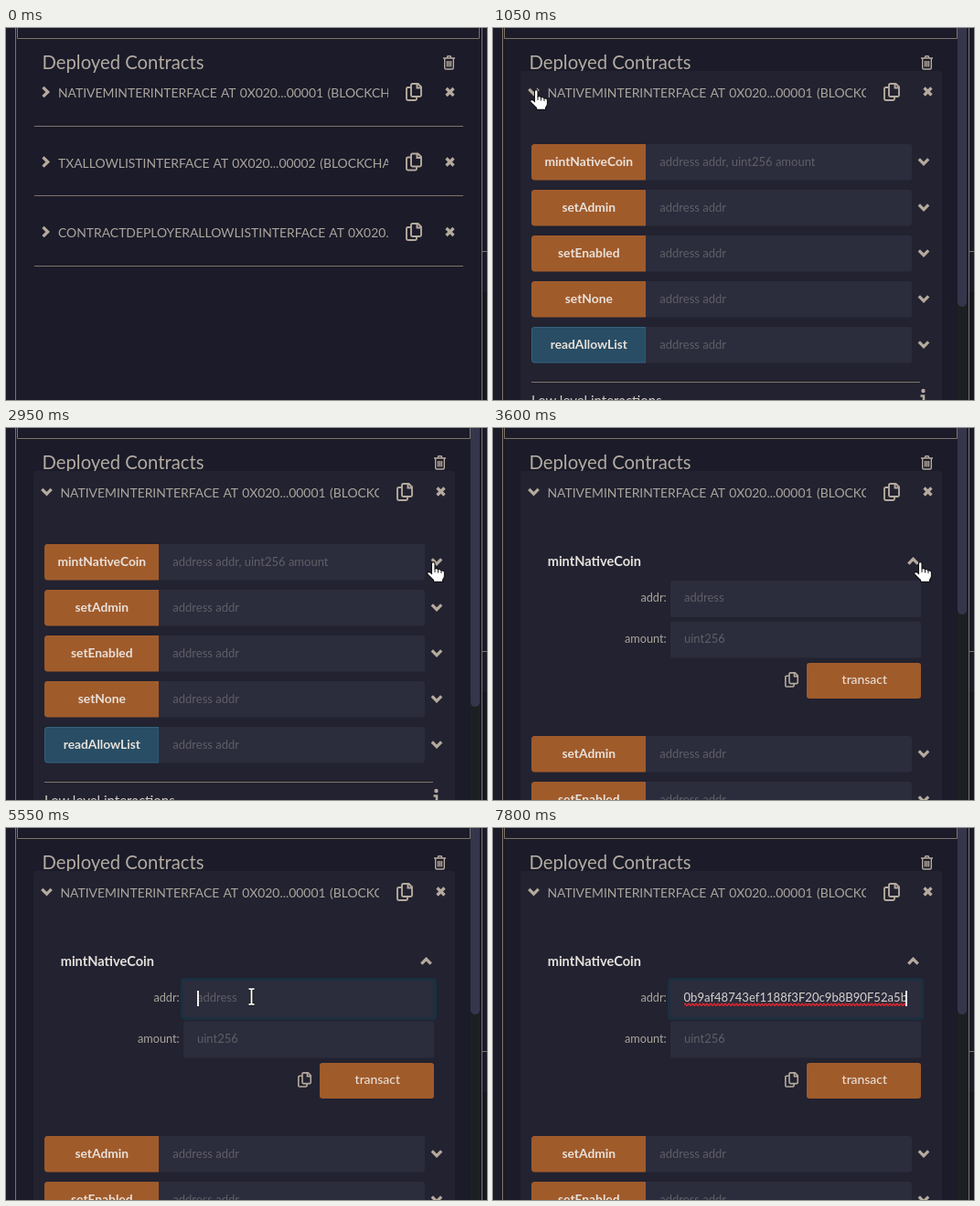
Animation, 526 px wide and 407 px high, one loop 8 s. Source, as an HTML page:

```html
<!DOCTYPE html>
<html lang="en">
<head>
<meta charset="utf-8">
<title>Deployed Contracts</title>
<style>
html, body { margin: 0; width: 100%; height: 100%; overflow: hidden; background: #1b1b29; }
svg { display: block; }
text { font-family: Lato, "Open Sans", sans-serif; font-size: 13px; fill: #aba59d; white-space: pre; }
.title { font-size: 20.3px; fill: #b3aba1; }
.head { font-size: 13.9px; word-spacing: 1px; }
.btn { font-size: 13.8px; font-weight: 700; fill: #e9e1d9; text-anchor: middle; }
.send { font-size: 13.9px; font-weight: 500; fill: #e9e1d9; text-anchor: middle; }
.name { font-size: 14.6px; font-weight: 700; fill: #e6e1dc; }
.hint { fill: #605f67; }
.label { font-size: 12.7px; text-anchor: end; }
.low { font-size: 15px; fill: #d3cdc6; }
.value { font-size: 13.1px; fill: #d8d3ce; text-anchor: end; }
.line { fill: none; stroke: #7d7368; }
.icon { fill: none; stroke: #b5aa9d; stroke-width: 2; }
.bold { stroke-width: 3.3; }
</style>
</head>
<body>
<svg id="stage" width="526" height="407" viewBox="0 0 526 407"></svg>
<script>
const LOOP = 8000, STEP = 50;
const stage = document.getElementById('stage');

const rect = (x, y, w, h, fill, r = 0, more = '') =>
  `<rect x="${x}" y="${y}" width="${w}" height="${h}" rx="${r}" fill="${fill}" ${more}/>`;
const text = (x, y, s, cls) => `<text x="${x}" y="${y}" class="${cls}">${s}</text>`;
const path = (d, cls, more = '') => `<path d="${d}" class="${cls}" ${more}/>`;
const group = (id, body) => `<g id="${id}">${body}</g>`;
const clip = (x, y, w, h, body) =>
  `<svg x="${x}" y="${y}" width="${w}" height="${h}" viewBox="${x} ${y} ${w} ${h}" overflow="hidden">${body}</svg>`;

const right = (x, y) => path(`M${x - 3} ${y - 5.2}l5.2 5.2l-5.2 5.2`, 'icon bold');
const down = (x, y) => path(`M${x - 5.2} ${y - 2.6}l5.2 5.2l5.2 -5.2`, 'icon bold');
const up = (x, y) => path(`M${x - 5.2} ${y + 2.6}l5.2 -5.2l5.2 5.2`, 'icon bold');
const cross = (x, y) => path(`M${x - 4} ${y - 4}l8 8m0 -8l-8 8`, 'icon bold');
const copy = (x, y, k = 1) => path(
  'M7 1H13.5L17 4.5V13.5Q17 15 15.5 15H7.5Q6 15 6 13.5V2.5Q6 1 7.5 1M12.5 1V5.5H17' +
  'M6 5H2.5Q1 5 1 6.5V17.5Q1 19 2.5 19H10.5Q12 19 12 17.5V15',
  'icon', `transform="translate(${x} ${y}) scale(${k})" style="stroke-width:1.9"`);
const trash = (x, y) => path(
  'M0 3H13M4 3L5 .8H8L9 3M1.7 3V13.5Q1.7 15 3.2 15H9.8Q11.3 15 11.3 13.5V3M4.5 6V12.5M6.5 6V12.5M8.5 6V12.5',
  'icon', `transform="translate(${x} ${y})" style="stroke-width:1.4"`);

const topBox = edge =>
  path(`M12.5 0V11.5H${edge}V0`, 'line') + text(39.5, 45, 'Deployed Contracts', 'title');

function contract(label, i) {
  const y = i * 76.5;
  return right(43.5, 70 + y) +
    clip(57, 58 + y, 361, 26, text(57, 76 + y, label, 'head')) +
    copy(437, 60 + y) + cross(485.5, 70 + y) +
    path(`M31 ${Math.floor(107 + y) + .5}H500`, 'line');
}

const ORANGE = '#a05b2b', BLUE = '#284d65', INPUT = '#2b2c3c';

// Button with rounded left corners, joined to an input with rounded right ones
const method = (y, name, args = 'address addr', tone = ORANGE, edge = tone) =>
  `<path d="M167 ${y + .5}H45q-2.5 0 -2.5 2.5v33.5q0 2.5 2.5 2.5H167Z" fill="${tone}" stroke="${edge}"/>` +
  `<path d="M167 ${y}H455q3 0 3 3v33.5q0 3 -3 3H167Z" fill="${INPUT}"/>` +
  text(104.8, y + 23.5, name, 'btn') + text(182.3, y + 23.5, args, 'hint') + down(471, y + 19);

const squiggle = `M209 193.3${'q1 -2 2 0t2 0'.repeat(61)}`;
const field = (y, label) =>
  text(189.7, y + 23, label, 'label') + rect(194, y, 274, 40, INPUT, 2);

stage.innerHTML =
  rect(0, 0, 526, 407, '#1b1b29') +
  rect(521, 289, 5, 118, '#171720') +
  path('M10.5 0V407M520.5 0V407M521 244.5H526', 'line') +
  group('closed',
    topBox(517.5) + trash(478, 30) +
    ['NATIVEMINTERINTERFACE AT 0X020...00001 (BLOCKCHAIN)',
     'TXALLOWLISTINTERFACE AT 0X020...00002 (BLOCKCHAIN)',
     'CONTRACTDEPLOYERALLOWLISTINTERFACE AT 0X020...00000'].map(contract).join('')) +
  group('open',
    topBox(507.5) + trash(468, 30) +
    rect(30, 47, 461, 370, '#222230', 3) +
    down(44.5, 69.5) +
    clip(60, 58, 348, 26, text(59.5, 76, 'NATIVEMINTERINTERFACE AT 0X020...00001 (BLOCKCHAIN)', 'head')) +
    copy(427, 60) + cross(475.5, 69.5) +
    rect(508, 0, 10, 407, '#1c2022') +
    '<rect id="thumb" x="508" y="-10" width="10" rx="5" fill="#35364b"/>') +
  group('list',
    method(127, 'mintNativeCoin', 'address addr, uint256 amount') +
    method(177, 'setAdmin') + method(227, 'setEnabled') + method(277, 'setNone') +
    method(327, 'readAllowList', 'address addr', BLUE, '#35637e') +
    path('M42 387.5H467', 'line') +
    text(42, 413, 'Low level interactions', 'low') +
    '<circle cx="470.5" cy="397" r="2.2" fill="#b5aa9d"/>' +
    path('M467.5 402.5H471V407', 'icon', 'style="stroke-width:2.6"')) +
  group('form',
    text(59.7, 151, 'mintNativeCoin', 'name') + up(459.5, 146) +
    field(167, 'addr:') + field(211.5, 'amount:') +
    group('focus',
      rect(192.5, 165.5, 277, 43, INPUT, 3, 'stroke="#1b3040" stroke-width="3"')) +
    group('empty', text(209, 190, 'address', 'hint')) +
    group('filled',
      clip(209, 175, 244, 22,
        text(453, 190, '00b9af48743ef1188f3F20c9b8B90F52a5b', 'value') +
        path(squiggle, '', 'fill="none" stroke="#e0262c" stroke-width="1.5"'))) +
    '<rect id="caret" y="178" width="2" height="17" fill="#f2efec"/>' +
    text(209, 235, 'uint256', 'hint') +
    copy(319, 267, .84) + rect(343, 257, 125, 39, ORANGE, 3) + text(406.3, 280, 'transact', 'send') +
    method(337, 'setAdmin') + method(387, 'setEnabled')) +
  group('arrow',
    '<path d="M.7 .8V18L4.6 15L7.3 20.3L10.6 18.8L8.6 13.6H12Z" fill="#555552" stroke="#e4e2de" stroke-width="1.2" stroke-linejoin="round"/>') +
  group('hand',
    '<path transform="translate(-7 0)" d="M5.5 2.5Q5.5 .6 7.2 .6Q9 .6 9 2.5V8Q11.5 7 12.5 8.8Q15 8 16 10Q19.4 9.4 19.4 12.5V16Q19.4 18 17.6 20V22.4H7.6V20.5L1 14Q.2 11.6 2.4 11.4Q3.6 11.4 5.5 13.4Z" fill="#fff" stroke="#111" stroke-width="1.1"/>' +
    '<path transform="translate(-7 0)" d="M9 8V12M12.5 9V12.5M16 10V13" stroke="#222" fill="none"/>') +
  group('beam',
    ['#111" stroke-width="3.6', '#fff" stroke-width="1.8'].map(s =>
      `<path d="M-3 -8.3H-1Q0 -8.3 0 -7.3V7.3Q0 8.3 -1 8.3H-3M3 -8.3H1Q0 -8.3 0 -7.3M0 7.3Q0 8.3 1 8.3H3" fill="none" stroke="${s}"/>`).join(''));

const el = {};
stage.querySelectorAll('[id]').forEach(e => el[e.id] = e);
const show = (id, on) => el[id].setAttribute('visibility', on ? 'visible' : 'hidden');

// Pointer stops: time, x, y
const across = [[1450, 47, 67], [2000, 153, 105], [2300, 237.5, 137.5], [2950, 467, 146]];
const back = [[4300, 467, 146], [4750, 405, 154], [5150, 284.5, 176.5], [5300, 268.5, 184.5]];

// Smooth curve through the stops, at rest at both ends
function follow(stops, t) {
  const last = stops.length - 1;
  if (t <= stops[0][0]) return stops[0].slice(1);
  if (t >= stops[last][0]) return stops[last].slice(1);
  let i = 0;
  while (t >= stops[i + 1][0]) i++;
  const a = stops[i], b = stops[i + 1], h = b[0] - a[0], u = (t - a[0]) / h;
  const slope = (k, c) => k === 0 || k === last ? 0 :
    (stops[k + 1][c] - stops[k - 1][c]) / (stops[k + 1][0] - stops[k - 1][0]);
  return [1, 2].map(c =>
    a[c] * (1 + 2 * u) * (1 - u) ** 2 + b[c] * u * u * (3 - 2 * u) +
    h * u * (1 - u) * (slope(i, c) * (1 - u) - slope(i + 1, c) * u));
}

function pointer(t) {
  if (t < 500 || t >= 7800) return null;
  if (t < 1450) {
    const k = (1 - Math.min(1, (t - 500) / 400)) ** 2.5;
    return [47 - 27 * k, 67 - 58 * k];
  }
  if (t < 4300) return follow(across, t);
  if (t < 7250) return follow(back, t);
  const k = ((t - 7200) / 550) ** 2.5;
  return [268.5 + 50 * k, 184.5 - 139 * k];
}

function shape(t, x, y) {
  if (t < 1050) return y > 58 ? 'hand' : 'arrow';
  if (t < 3600) {
    if (x < 55 || x > 462) return 'hand';
    return x > 167 && x < 458 && y > 127 ? 'beam' : 'arrow';
  }
  if (x > 452 && y < 160) return 'hand';
  return x > 194 && x < 468 && y > 167 ? 'beam' : 'arrow';
}

function draw(t) {
  const open = t >= 1050, form = t >= 3600, pasted = t >= 6200;
  show('closed', !open);
  show('open', open);
  show('list', open && !form);
  show('form', form);
  el.thumb.setAttribute('height', form ? 214 : 315);
  show('focus', t >= 5450);
  el.focus.setAttribute('opacity', t < 5550 ? .5 : 1);
  show('empty', form && !pasted);
  show('filled', pasted);
  show('caret', t >= 5450 && !(t >= 6000 && t < 6200) && !(t >= 6800 && t < 7300));
  el.caret.setAttribute('x', pasted ? 451 : 209);

  const p = pointer(t), kind = p && shape(t, ...p);
  for (const id of ['arrow', 'hand', 'beam']) {
    show(id, id === kind);
    if (id === kind) el[id].setAttribute('transform', `translate(${p[0].toFixed(1)} ${p[1].toFixed(1)})`);
  }
}

function tick() {
  draw(Math.floor(performance.now() % LOOP / STEP) * STEP);
  requestAnimationFrame(tick);
}
tick();
</script>
</body>
</html>
```
